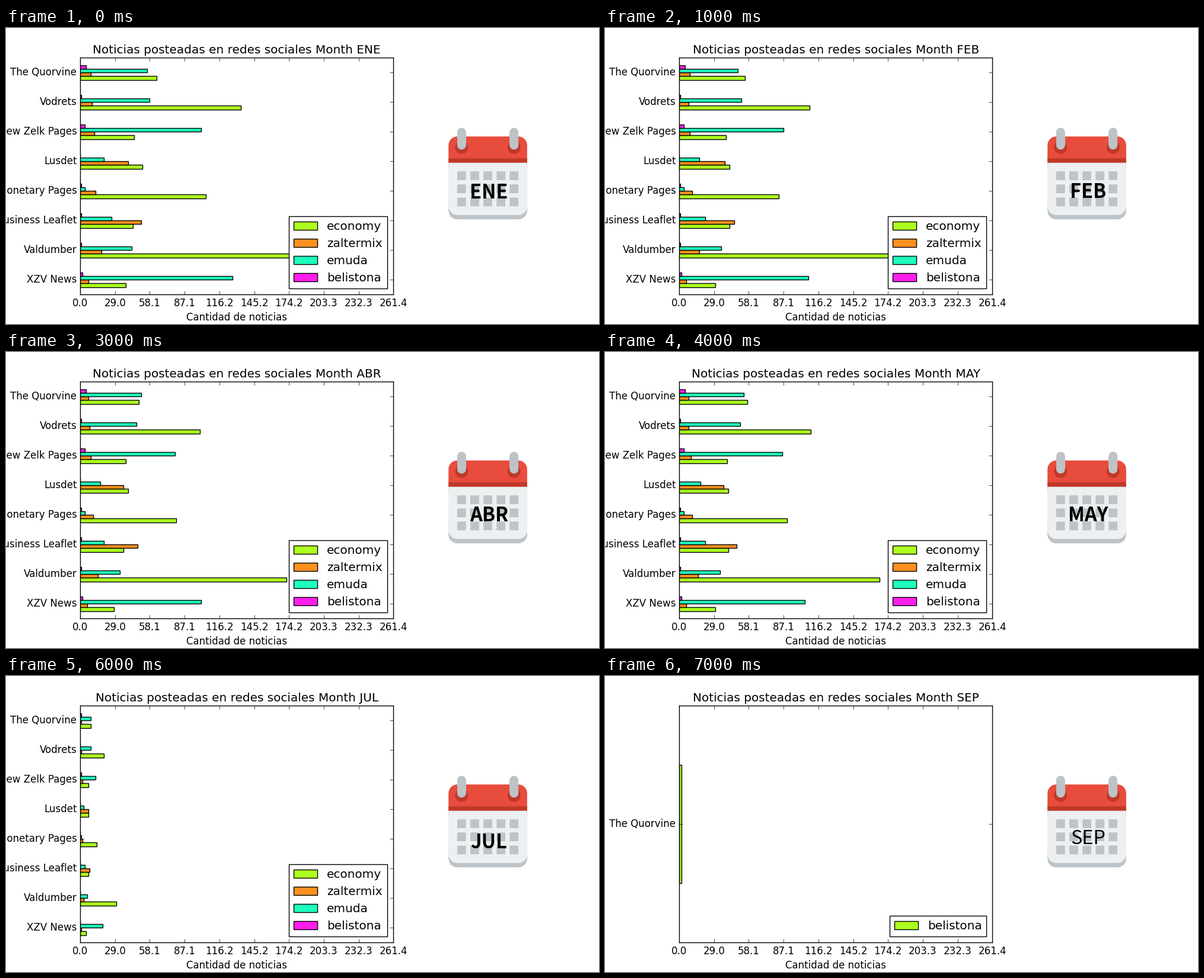
These frames come from a looping animation (1000x500 px, 8 s). A matplotlib script:

```python
import matplotlib.pyplot as plt
import numpy as np
from matplotlib.animation import FuncAnimation
from matplotlib.patches import Circle, Rectangle

plt.style.use("classic")
plt.rcParams.update({"font.family": "DejaVu Sans", "figure.facecolor": "white",
                     "figure.dpi": 100, "savefig.dpi": 100})

WIDTH, HEIGHT, DPI = 1000, 500, 100
PT = 72 / DPI
X_MAX = 261.36

# Month: (share of the usual news volume, baseline of its name on the calendar)
MONTHS = {"ENE": (1.15, 288), "FEB": (1.0, 287), "MAR": (0.92, 286),
          "ABR": (0.95, 286), "MAY": (0.97, 286), "JUN": (0.96, 285),
          "JUL": (0.17, 291), "SEP": (0, 284)}

SERIES = {"economy": "#acff1f", "zaltermix": "#ff8f1f",
          "emuda": "#1fffbe", "belistona": "#ff1fec"}

# Usual monthly news per outlet, one count for each series
OUTLETS = {
    "The Quorvine": (55, 8, 52, 5),
    "Vodrets": (112, 8, 50, 1),
    "New Zelk Pages": (39, 10, 84, 4),
    "Lusdet": (43, 37, 17, 0),
    "Monetary Pages": (87, 11, 4, 1),
    "Business Leaflet": (41, 47, 22, 1),
    "Valdumber": (172, 16, 35, 1),
    "XZV News": (32, 6, 108, 2),
}

# Calendar grid: everything is a multiple of UNIT from its top left corner
LEFT, TOP, UNIT = 746.2, 168.5, 7.37
RED, DARK_RED, GREY, PAPER = "#e84c3d", "#c0392b", "#bdc3c7", "#ecf0f1"

fig = plt.figure(figsize=(WIDTH / DPI, HEIGHT / DPI), dpi=DPI)
chart = fig.add_axes([0.125, 0.1, 0.52841, 0.8])
overlay = fig.add_axes([0, 0, 1, 1], zorder=5)


def news_counts(frame, month):
    rng = np.random.default_rng(frame)
    usual = np.array(list(OUTLETS.values()))
    jitter = rng.uniform(0.93, 1.07, usual.shape)
    return (usual * MONTHS[month][0] * jitter).round().T


def boxed(x0, y0, x1, y1, color):
    overlay.add_patch(Rectangle((x0, y0), x1 - x0, y1 - y0,
                                fc=color, ec="black", lw=1))


def block(col, row, cols, rows, color, radius=0):
    """Rectangle on the calendar grid; a round-joined outline rounds it."""
    x, y = LEFT + (col + radius) * UNIT, TOP + (row + radius) * UNIT
    overlay.add_patch(Rectangle(
        (x, y), (cols - 2 * radius) * UNIT, (rows - 2 * radius) * UNIT,
        fc=color, ec=color if radius else "none", lw=2 * radius * UNIT * PT,
        joinstyle="round", snap=False))


def draw_calendar(month):
    block(0, 9, 18, 12, GREY, 2)
    block(0, 2, 18, 9, RED, 2)
    block(0, 8, 18, 8, PAPER)
    block(0, 9, 18, 11, PAPER, 2)
    block(0, 7, 18, 1, DARK_RED)
    for col in (3, 15):
        center = LEFT + col * UNIT, TOP + 4.5 * UNIT
        overlay.add_patch(Circle(center, 1.5 * UNIT, fc=DARK_RED, ec="none"))
        block(col - 1, 0, 2, 5, GREY, 0.99)
    for row in range(10, 17, 3):
        for col in range(2, 15, 3):
            block(col, row, 2, 2, GREY)
    overlay.text(814.5, MONTHS[month][1], month, family="Noto Sans CJK JP",
                 weight="normal" if month == "SEP" else "bold",
                 size=32.5 * PT, ha="center", va="baseline")


def draw_legend(labels, left):
    top = 434 - 29 * len(labels)
    boxed(left, top, 643, 440, "white")
    for i, (label, color) in enumerate(zip(labels, SERIES.values())):
        base = top + 23 + 29 * i
        boxed(left + 8, base - 14, left + 48, base, color)
        overlay.text(left + 64, base, label, size=20 * PT, va="baseline")


def draw_chart(month, outlets, series):
    thickness = 0.5 / len(series)
    rows = np.arange(len(outlets))
    for k, (values, color) in enumerate(zip(series, SERIES.values())):
        chart.barh(rows + 0.25 - thickness * (k + 0.5), values, thickness,
                   color=color, edgecolor="black", linewidth=1)
    ticks = np.linspace(0, X_MAX, 10)
    chart.set_xlim(0, X_MAX)
    chart.set_ylim(len(outlets) - 0.5, -0.5)
    chart.set_xticks(ticks, [f"{t:.1f}" for t in ticks])
    chart.set_yticks(rows, outlets)
    chart.set_xlabel("Cantidad de noticias")
    chart.set_title(f"Noticias posteadas en redes sociales Month {month}")


def update(frame):
    month = list(MONTHS)[frame]
    outlets, labels = list(OUTLETS), list(SERIES)
    chart.clear()
    overlay.clear()
    overlay.set_axis_off()
    overlay.set_xlim(0, WIDTH)
    overlay.set_ylim(HEIGHT, 0)
    if month == "SEP":
        draw_chart(month, outlets[:1], [[2]])
        draw_legend(labels[-1:], 480)
    else:
        draw_chart(month, outlets, news_counts(frame, month))
        draw_legend(labels, 477)
    draw_calendar(month)
    return []


anim = FuncAnimation(fig, update, frames=len(MONTHS), init_func=lambda: [],
                     interval=1000, repeat=True, repeat_delay=0)
plt.show()
```
